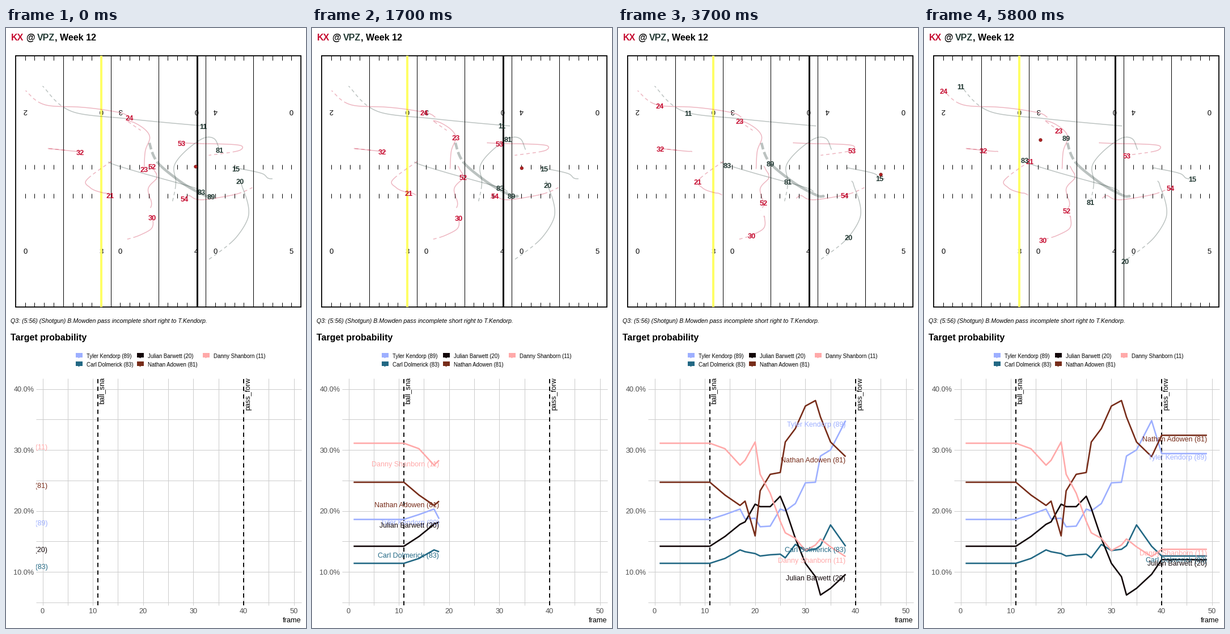
A matplotlib script that plays this animation: 529 by 1058 pixels, repeating every 5900 ms.

```python
import numpy as np
import matplotlib.pyplot as plt
from matplotlib.animation import FuncAnimation
from matplotlib.patches import Circle, Polygon, Rectangle

W, H, DPI = 529, 1058, 100
PT = 72 / DPI
FRAMES, LAST, SNAP, THROW = 59, 49, 11, 40
RED, GREEN, GRID, GREY = "#c60c30", "#203731", "#cccccc", "#4d4d4d"

plt.rcParams["font.family"] = "Liberation Sans"
fig = plt.figure(figsize=(W / DPI, H / DPI), dpi=DPI, facecolor="white")
ax = fig.add_axes([0, 0, 1, 1])
ax.set_xlim(-0.5, W - 0.5)
ax.set_ylim(H - 0.5, -0.5)
ax.axis("off")


def line(xs, ys, color="black", px=1.0, z=2, **kw):
    kw.setdefault("solid_capstyle", "butt")
    return ax.plot(xs, ys, color=color, lw=px * PT, zorder=z, **kw)[0]


def dashes(px, on, off, start=0):
    return (start / px, (on / px, off / px))


def say(x, y, s, px, color="black", z=5, **kw):
    """Text whose capitals are centred on y."""
    return ax.text(x, y + 0.36 * px, s, fontsize=px * PT, color=color,
                   zorder=z, va="baseline", **kw)


def glide(t, p, at):
    """Smooth cubic curve through the knots that slows towards its end."""
    m = np.gradient(p, t)
    m[-1] /= 2
    i = np.clip(np.searchsorted(t, at, side="right") - 1, 0, len(t) - 2)
    h = t[i + 1] - t[i]
    u = (at - t[i]) / h
    return ((1 + 2 * u) * (1 - u) ** 2 * p[i] + u * (1 - u) ** 2 * h * m[i]
            + u * u * (3 - 2 * u) * p[i + 1] + u * u * (u - 1) * h * m[i + 1])


# ---------------------------------------------------------------- field
LEFT, RIGHT, TOP, BOTTOM = 16.4, 519.6, 48.6, 491.4
YARD = (RIGHT - LEFT) / 30


def draw_field():
    ax.add_patch(Rectangle((LEFT, TOP), RIGHT - LEFT, BOTTOM - TOP, fill=False,
                           lw=1.8 * PT, zorder=2))
    for i in range(1, 30):
        x = LEFT + YARD * i
        if i % 5 == 0:
            line([x, x], [TOP, BOTTOM])
        for y in (TOP, 240.5, 291.5, BOTTOM - 8):
            line([x, x], [y, y + 8])
    for i, (up, down) in enumerate(zip("203040", "030405")):
        x = LEFT + YARD * (1 + 10 * (i // 2) + 8 * (i % 2))
        ax.text(x, 142.3, up, fontsize=13 * PT, rotation=180, ha="center",
                va="baseline", rotation_mode="anchor", zorder=2)
        say(x, 393, down, 13, ha="center", z=2)
    line([167.6, 167.6], [TOP, BOTTOM], "#ffff66", 4, 3)
    line([336, 336], [TOP, BOTTOM], px=3, z=3)


class Player:
    """Number running along its faint trail through six points."""
    TIMES = np.array([1, 9, 18, 31, 38, LAST], float)

    def __init__(self, number, color, *points, bold=False):
        self.x, self.y = np.array(points, float).T
        split, end, px = (38.7, 46, 4.6) if bold else (THROW, LAST, 1.5)
        gap = dashes(px, 14, 5, 14) if bold else dashes(px, 6, 5)
        for a, b, style in ((1, split, "-"), (split, end, gap)):
            line(*self.at(np.linspace(a, b, 120)), color, px, 4, alpha=0.3,
                 linestyle=style, dash_capstyle="butt")
        self.tag = say(0, 0, number, 12.7, color, 6, ha="center", weight="bold")

    def at(self, t):
        return glide(self.TIMES, self.x, t), glide(self.TIMES, self.y, t)

    def move(self, k):
        x, y = self.at(k)
        self.tag.set_position((x, y + 1 + 0.36 * 12.7))


class Ball:
    """Rests, is snapped back, drifts with the passer, then flies."""
    TIMES = (1, 15, 24, 38, THROW, LAST)
    X, Y = (334, 334, 440, 463, 463, 205), (244, 245, 250, 258, 257, 197)

    def __init__(self):
        self.dot = ax.add_patch(Circle((0, 0), 2.7, fc="#b22222", ec="#7a1414",
                                       lw=0.8 * PT, zorder=7))

    def move(self, k):
        self.dot.center = (np.interp(k, self.TIMES, self.X),
                           np.interp(k, self.TIMES, self.Y))


draw_field()
players = [
    Player("24", RED, (217, 157), (210, 152), (197, 148), (130, 139), (73, 136), (34, 110)),
    Player("23", RED, (243, 248), (245, 217), (253, 192), (229, 168), (214, 163), (237, 180)),
    Player("52", RED, (257, 243), (260, 249), (266, 262), (250, 286), (256, 307), (251, 321)),
    Player("30", RED, (257, 333), (257, 331), (258, 334), (254, 355), (235, 365), (209, 373)),
    Player("32", RED, (130, 218), (129, 217), (123, 217), (93, 214), (74, 212), (104, 215)),
    Player("21", RED, (183, 294), (177, 291), (170, 290), (148, 281), (140, 270), (186, 234)),
    Player("53", RED, (309, 202), (310, 202), (330, 203), (414, 207), (412, 215), (357, 224)),
    Player("54", RED, (314, 300), (316, 298), (322, 295), (351, 302), (399, 294), (434, 281)),
    Player("11", GREEN, (347, 172), (347, 172), (334, 171), (209, 159), (123, 149), (64, 102)),
    Player("81", GREEN, (376, 214), (367, 195), (345, 195), (296, 243), (299, 270), (293, 306)),
    Player("15", GREEN, (405, 247), (404, 246), (409, 247), (453, 257), (461, 264), (473, 265)),
    Player("20", GREEN, (412, 269), (412, 270), (415, 276), (426, 335), (406, 368), (354, 410)),
    Player("83", GREEN, (344, 288), (343, 287), (331, 281), (235, 254), (192, 241), (177, 232)),
    Player("89", GREEN, (361, 296), (361, 296), (351, 295), (301, 266), (268, 238), (250, 193),
           bold=True),
]

# ---------------------------------------------------------------- headings
for x, s, c in ((8, "KX", RED), (34.7, "@", "black"), (54.8, "VPZ", GREEN),
                (85.9, ", Week 12", "black")):
    say(x, 15.5, s, 16, c, weight="bold")
say(8, 515.5, "Q3: (5:56) (Shotgun) B.Mowden pass incomplete short right to T.Kendorp.",
    10.67, style="italic")
say(8, 545, "Target probability", 16, weight="bold")

# ---------------------------------------------------------------- chart
PL, PR, PTOP, PBOT = 52, 520, 617, 1017
panel = ax.add_patch(Rectangle((PL, PTOP), PR - PL, PBOT - PTOP,
                               fc="none", ec="none"))


def col(k):
    return 64 + 8.865 * k


def row(percent):
    return 1066 - 10.75 * percent


def clipped(text):
    text.set_clip_on(True)
    text.set_clip_path(panel)
    return text


def draw_panel():
    for k in range(0, 51, 5):
        line([col(k)] * 2, [PTOP, PBOT], GRID, 1, 1)
        if k % 10 == 0:
            say(col(k), 1027, str(k), 12.8, GREY, ha="center")
    for p in range(5, 41, 5):
        line([PL, PR], [row(p)] * 2, GRID, 1, 1)
        if p % 10 == 0:
            say(49, row(p), f"{p:.1f}%", 12.8, GREY, ha="right")
    say(520, 1043, "frame", 12.7, ha="right")
    for k, event in ((SNAP, "ball_snap"), (THROW, "pass_forward")):
        line([col(k)] * 2, [PBOT, PTOP], px=1.9, z=4, dash_capstyle="butt",
             linestyle=dashes(1.9, 7.5, 6))
        clipped(ax.text(col(k) + 11, 635, event, fontsize=12.6 * PT, rotation=90,
                        ha="center", va="baseline", rotation_mode="anchor",
                        zorder=5))


class Series:
    """Probability line, flat before the snap and after the throw."""
    TURNS = (SNAP, 14, 17, 18, 20, 21, 23, 25, 26, 28, 30, 32, 33, 35, 38, THROW)

    def __init__(self, name, color, key, *percents):
        k = np.arange(1, LAST + 1)
        self.x, self.y = col(k), row(np.interp(k, self.TURNS, percents))
        self.curve = line([], [], color, 2.6, 4.5, solid_joinstyle="round")
        self.tag = clipped(say(0, 0, name, 12.55, color, ha="right"))
        self.draw_key(*key, name, color)

    def draw_key(self, x, y, name, color):
        ax.add_patch(Rectangle((x, y - 4.5), 12, 8, fc=color, ec="none"))
        ax.add_patch(Polygon([(x + 4, y + 3), (x + 8, y + 3), (x + 6, y + 5)],
                             fc=color, ec="none"))
        say(x + 19.5, y + 0.7, name, 9.7)

    def move(self, k):
        n = k if k > 1 else 0
        self.curve.set_data(self.x[:n], self.y[:n])
        self.tag.set_position((self.x[k - 1], self.y[k - 1] + 6 + 0.36 * 12.55))


draw_panel()
series = [
    Series("Tyler Kendorp (89)", "#9dafff", (122, 577), 18.6, 19.4, 20.3, 18.7, 18.8,
           17.4, 17.5, 20.3, 20, 21.2, 24.6, 24.7, 29, 30, 34.8, 29.4),
    Series("Carl Dolmerick (83)", "#226884", (122, 592), 11.4, 12.2, 13.6, 13.3, 13,
           12.6, 12.8, 12.9, 12.3, 14.5, 13.5, 13.7, 14.3, 17.7, 14.2, 12.6),
    Series("Julian Barwett (20)", "#120608", (230, 577), 14.2, 15.8, 17.8, 18.2, 21.1,
           20.7, 20.7, 22.4, 20.4, 15.5, 11.4, 9.2, 6.2, 7.3, 9.6, 12),
    Series("Nathan Adowen (81)", "#772c19", (230, 592), 24.7, 22.6, 20.9, 21.6, 15.9,
           23.3, 26, 26.3, 31.3, 33.5, 37.2, 38.1, 35.4, 31.3, 28.9, 32.4),
    Series("Danny Shanborn (11)", "#ffa9a9", (346, 577), 31.1, 30.2, 27.5, 28.3, 31.3,
           26, 22.9, 18.3, 16.4, 15.5, 13.5, 14.4, 15.4, 14.1, 12.5, 13.7),
]
movers = players + series + [Ball()]


def update(n):
    for part in movers:
        part.move(min(n + 1, LAST))
    return []


anim = FuncAnimation(fig, update, frames=FRAMES, interval=100, repeat=True,
                     repeat_delay=0, init_func=lambda: update(0), blit=False)
plt.show()
```
